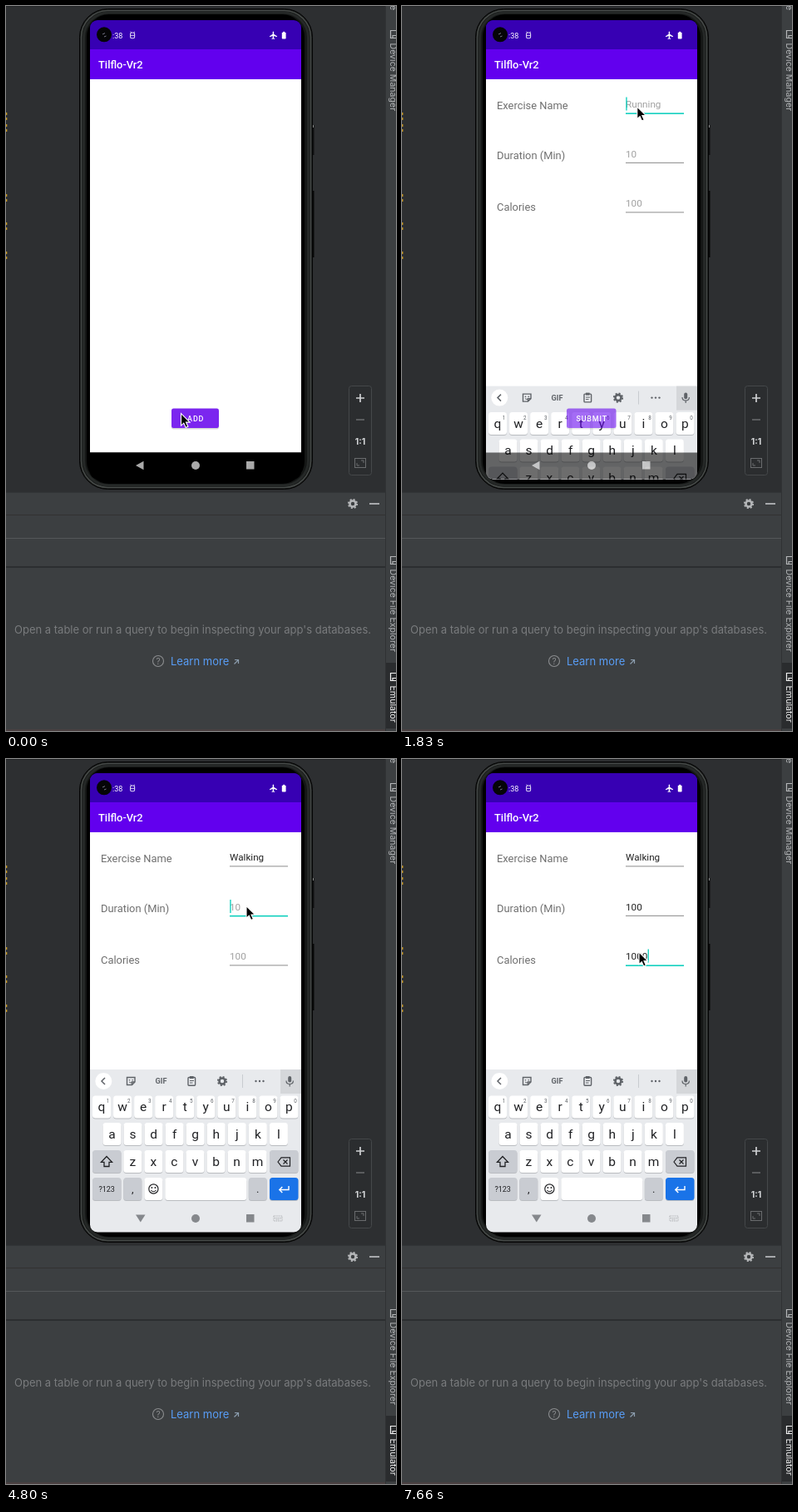
An HTML page that plays this animation: 469 px wide and 871 px high, repeating every 8000 ms.

```html
<!DOCTYPE html>
<html lang="en">
<head>
<meta charset="utf-8">
<title>Workout form demo</title>
<style>
html, body { margin: 0; width: 100%; height: 100%; overflow: hidden; background: #2d2f31; }
svg { display: block; }
text { font-family: Roboto, sans-serif; white-space: pre; }
.ide { font-family: Inter, sans-serif; }
</style>
</head>
<body>
<svg id="stage" width="469" height="871" viewBox="0 0 469 871"></svg>
<script>
const LOOP = 8000;
const stage = document.getElementById('stage');

// --- markup helpers ---
const rect = (x, y, w, h, fill, r = 0, more = '') =>
  `<rect x="${x}" y="${y}" width="${w}" height="${h}" rx="${r}" fill="${fill}" ${more}/>`;
const circle = (x, y, r, fill, more = '') => `<circle cx="${x}" cy="${y}" r="${r}" fill="${fill}" ${more}/>`;
const path = (d, fill, more = '') => `<path d="${d}" fill="${fill}" ${more}/>`;
const line = (d, color, w = 1, more = '') => path(d, 'none', `stroke="${color}" stroke-width="${w}" ${more}`);
const text = (x, y, s, size, fill, more = '') =>
  `<text x="${x}" y="${y}" font-size="${size}" fill="${fill}" ${more}>${s}</text>`;
const mid = (x, y, s, size, fill, more = '') => text(x, y, s, size, fill, 'text-anchor="middle" ' + more);
const group = (id, body, more = '') => `<g id="${id}" ${more}>${body}</g>`;
const gear = (x, y, color) =>
  circle(x, y, 3.5, 'none', `stroke="${color}" stroke-width="2.6"`) +
  circle(x, y, 5.1, 'none', `stroke="${color}" stroke-width="2" stroke-dasharray="2 2.005"`);

// --- IDE around the phone ---
function sideTab(y, label, color) {
  return line(`M469 ${y}H462.5V${y + 9}H469M465 ${y + 9}V${y + 6}H469`, color, 1.2) +
    text(0, 0, label, 10.6, color, `class="ide" transform="translate(462 ${y + 15}) rotate(90)"`);
}

function ide() {
  const grey = '#b4b6b8', dim = '#6a6c6e';
  const ticks = [128, 142, 226, 260, 295].map(y =>
    rect(0, y, 1.3, 3, '#c99a22') + rect(0, y + 6, 1.3, 3, '#c99a22')).join('');
  return rect(0, 0, 469, 871, '#2d2f31') + rect(0, 0, 469, 1, '#242628') + ticks +
    rect(0, 585, 457, 286, '#3c3f41') + rect(0, 584, 457, 1, '#323537') +
    rect(0, 611, 457, 1, '#323232') + rect(0, 639, 457, 1, '#555759') +
    rect(0, 673, 457, 2, '#2c2e30') + rect(0, 869, 457, 2, '#4a4041') +
    rect(456, 0, 13, 871, '#3c3f41') + rect(456, 0, 1, 871, '#303234') +
    rect(457, 789, 12, 79, '#2a2c2e') +
    text(0, 0, 'e', 10.6, grey, 'class="ide" transform="translate(462 -1) rotate(90)"') +
    sideTab(29.5, 'Device Manager', grey) + sideTab(661.5, 'Device File Explorer', grey) +
    sideTab(801.5, 'Emulator', '#f0f0f0') +
    rect(412.5, 456.5, 27, 107, '#2b2d2f', 3, 'stroke="#45484a"') +
    line('M421 471H431M426 466V476', '#cfd1d3', 1.7) + line('M421 497H431', dim, 1.5) +
    mid(426, 527, '1:1', 10.5, '#d5d7d9', 'class="ide" font-weight="700"') +
    rect(419.5, 543.5, 13, 11, 'none', 0, `stroke="${dim}"`) +
    line('M422 549V552H425M427 546H430V549', dim) +
    gear(417, 598, grey) + line('M437 598H449', grey, 1.8) +
    text(10, 754, "Open a table or run a query to begin inspecting your app's databases.", 13, '#797b7d', 'class="ide"') +
    circle(183, 787, 6.5, 'none', 'stroke="#8b8d8f" stroke-width="1.1"') +
    mid(183, 790.7, '?', 10, '#8b8d8f', 'class="ide"') +
    text(198, 792, 'Learn more', 13, '#589df6', 'class="ide"') +
    line('M274.5 790.5L279 786M275 785.5H279.5V790', '#8b9dae', 1.2);
}

function phone() {
  return rect(368, 143, 2.5, 36, '#101111') + rect(368, 143, 2, 3, '#8a8c8c') + rect(368, 222, 2.5, 80, '#070808') +
    rect(88.5, 3.5, 280, 577, '#151716', 34, 'stroke="#050505"') +
    rect(90.5, 5.5, 276, 573, 'none', 32, 'stroke="#464a48" stroke-width="1.5"') +
    rect(93.5, 8, 270, 568, 'none', 30, 'stroke="#252827" stroke-width="3"') +
    rect(97, 10, 262, 564, '#000', 27);
}

// --- app screens ---
const bars = rect(101, 17, 254, 36, '#3700b3') + rect(101, 52, 254, 36, '#6200ee') +
  text(111, 75, 'Tilflo-Vr2', 12.9, '#fff', 'font-weight="500"') + rect(101, 88, 254, 448.5, '#fff');

const button = (x, w, label, fill) =>
  rect(x, 485, w, 23.5, '#000', 2.5, 'opacity=".16"') + rect(x, 483.5, w, 23.5, fill, 2.5) +
  mid(228.2, 498.6, label, 9, '#fff', 'font-weight="500" letter-spacing=".8"');

const fields = [
  { label: 'Exercise Name', hint: 'Running', labelY: 124, y: 122 },
  { label: 'Duration (Min)', hint: '10', labelY: 184, y: 181.5 },
  { label: 'Calories', hint: '100', labelY: 246.3, y: 241 }
];

function form() {
  return bars + fields.map((f, i) =>
    text(114, f.labelY, f.label, 12.9, '#6f6f6f') +
    text(269, f.y, f.hint, 11.7, '#a0a0a0', `id="value${i}"`) +
    rect(269, f.y + 6.4, 70, 1, '#8c8c8c', 0, `id="under${i}"`)).join('') +
    rect(269, 123.6, 0, .8, '#333', 0, 'id="compose"') +
    rect(269, 0, 1.3, 16, '#03cdbb', 0, 'id="caret"');
}

function statusIcons() {
  return text(128, 38.8, ':38', 9, '#fff') +
    rect(149.6, 32, 5, 6.8, 'none', 1.6, 'stroke="#ddd6f3" stroke-width="1.1"') +
    line('M149.5 35.4H155M149.5 30.8L151 32M155 30.8L153.5 32', '#ddd6f3', .9) +
    path('M320.7 31Q321.4 30 322.1 31V33.7L326 36.2V37.3L322.1 36.1V38.4L323.2 39.2V40L321.4 39.5L319.6 40V39.2L320.7 38.4V36.1L317 37.3V36.2L320.7 33.7Z', '#fff') +
    rect(331.8, 31.8, 4.8, 7.8, '#fff', .8) + rect(333.2, 30.8, 2, 1.5, '#fff') +
    circle(118, 34.3, 9, '#050507') + line('M116 34L119 32.6M118 37L120.5 36', '#77778a', 1);
}

// --- keyboard ---
const INK = '#202124', SOFT = '#5f6368', STEP = 25.05;

function key(x, y, w, fill = '#fff') {
  return rect(x, y + 1, w, 27, '#b9bcc0', 3.5) + rect(x, y, w, 27, fill, 3.5);
}

function keyRow(chars, x, y) {
  return [...chars].map((c, i) => {
    const cx = x + i * STEP;
    const digit = y < 410 ? mid(cx + 7.6, y + 8.6, (i + 1) % 10, 6.3, SOFT) : '';
    return key(cx - 11, y, 22) + mid(cx, y + 18.8, c, 15.5, INK, 'class="letter"') + digit;
  }).join('');
}

const tools =
  line('M119 383L115 387L119 391', SOFT, 1.5) +
  line('M145.5 382.5H155V388L151.5 391.5H145.5ZM155 388H151.5V391.5', SOFT, 1.4) +
  circle(148.5, 385.8, .8, SOFT) + circle(152.2, 385.8, .8, SOFT) + line('M148 388Q150 390 152 388', SOFT) +
  mid(186.5, 390.3, 'GIF', 9.2, SOFT, 'font-weight="700"') +
  rect(219, 382.5, 8.6, 9.8, 'none', 1, `stroke="${SOFT}" stroke-width="1.4"`) +
  rect(221, 381, 4.6, 3, SOFT) + line('M221 386.5H226M221 389H224.5', SOFT) +
  gear(260, 387, SOFT) + rect(284, 379, 1, 16, '#c9ccd0') +
  [300.5, 305, 309.5].map(x => circle(x, 387, 1.2, SOFT)).join('');

const words = line('M115.5 383L119.5 387L115.5 391', SOFT, 1.5) +
  rect(190, 379, 1, 16, '#c9ccd0') + rect(264, 379, 1, 16, '#c9ccd0') +
  [157.5, 227, 296].map(x => mid(x, 391.5, '', 12, '#35373a', 'class="word"')).join('');

function keyboard() {
  const mod = '#c9ccd2';
  return rect(101, 373, 254, 196, '#e8eaed') + rect(330, 373, 25, 29, '#d5d7da') +
    circle(117.3, 387, 10, '#fff') + group('tools', tools) + group('words', words) +
    rect(339.2, 381, 4, 7.6, SOFT, 2) + line('M337 386.5Q337 390.5 341.2 390.5Q345.4 390.5 345.4 386.5M341.2 390.5V393.5', SOFT, 1.2) +
    keyRow('qwertyuiop', 115, 404.5) + keyRow('asdfghjkl', 127.5, 437) + keyRow('zxcvbnm', 152.3, 470) +
    key(104, 470, 34.5, mod) + key(317, 470, 34.5, mod) +
    line('M121 477.5L114.5 484.3H118V489.5H124V484.3H127.5Z', INK, 1.3) +
    line('M327 484L331 478.8H341.5V489.2H331ZM333.5 481.5L338.5 486.5M338.5 481.5L333.5 486.5', INK, 1.2) +
    key(104, 503, 34.5, mod) + mid(121.2, 519.8, '?123', 9, INK) +
    key(141.3, 503, 22, mod) + mid(152.3, 520.5, ',', 13, INK) +
    key(166.4, 503, 22) + circle(177.4, 516.5, 5.6, 'none', `stroke="${INK}" stroke-width="1.2"`) +
    circle(175.4, 515, .9, INK) + circle(179.4, 515, .9, INK) + line('M174.3 518Q177.4 521.6 180.5 518', INK, 1.1) +
    key(191.3, 503, 98) + key(291.8, 503, 22, mod) + mid(302.8, 520.5, '.', 13, INK) +
    key(317, 503, 34.5, '#1a73e8') +
    line('M340 513V517.5H329M332.3 514L328.8 517.5L332.3 521', '#fff', 1.4) +
    path('M156 547.5H167.5L161.8 556.5Z', '#85888c') + circle(228, 552, 5, '#85888c') + rect(289, 547, 9.5, 9.5, '#85888c') +
    rect(322, 549, 10, 6, 'none', 0, 'stroke="#a9abae" stroke-width="1" stroke-dasharray="1.2 1"') +
    line('M323 551.5H331M324.5 553.3H329.5', '#a9abae', 1, 'stroke-dasharray="1.2 1"');
}

const navBar = rect(101, 536.5, 254, 32, '#000') + path('M165.5 546.8V557.2L156 552Z', '#a9a9a9') +
  circle(228, 552, 5, '#a9a9a9') + rect(289, 547, 9.5, 9.5, '#a9a9a9');

stage.innerHTML = `<clipPath id="glass">${rect(101, 17, 254, 551.5, '#000', 9)}</clipPath>` + ide() + phone() +
  `<g clip-path="url(#glass)">` +
  group('home', bars + button(199, 57, 'ADD', '#7b26ef')) + group('form', form()) + group('keys', keyboard()) +
  group('nav', navBar) + group('submit', button(198, 59.5, 'SUBMIT', '#6200ee')) + '</g>' + statusIcons() +
  group('pointer', path('M0 0V14.6L3.3 11.6L5.7 17L8.4 15.8L6 10.6H10.6Z', '#000', 'stroke="#fff" stroke-width="1.1"'));

// --- timeline ---
const pointerPath = [
  [370, 210.5, 489.5], [560, 231, 335], [700, 254, 214.5], [820, 272, 165], [930, 280, 140], [990, 280, 140], [1280, 282.8, 121],
  [4160, 282.8, 121], [4600, 289, 174], [4720, 289, 176.5], [5690, 289, 176.5], [6300, 284, 232],
  [6480, 284, 234], [6650, 284, 234], [6710, 285, 232]
];
const focusTimes = [1460, 4700, 6400];
const typed = [
  [[2520, 'W'], [2670, 'Wa'], [2790, 'Wal'], [2910, 'Walk'], [3630, 'Walki'], [3720, 'Walkin'], [3820, 'Walking']],
  [[5250, '1'], [5370, '10'], [5490, '100']],
  [[6920, '1'], [7040, '10'], [7270, '100'], [7390, '1000']]
];
const suggestions = [
  [2520, 'We Why What'], [2670, 'Was Want Wait'], [2790, 'Wal Wall Walk'], [2910, 'Walk Walks Walked'],
  [3120, 'Walk Walking Wall'], [3630, 'Walki Walking Walkie'], [3720, 'Walkin Walking Walk'], [3920, 'Walking Walk Walked']
];

const $ = id => document.getElementById(id);
const set = (id, attrs) => { for (const k in attrs) $(id).setAttribute(k, attrs[k]); };
const clamp01 = v => Math.min(1, Math.max(0, v));
const progress = (t, a, b) => clamp01((t - a) / (b - a));
const easeOut = p => 1 - (1 - p) ** 2;
const latest = (list, t) => list.reduce((found, [at, v]) => t >= at ? v : found, '');
const letters = [...document.querySelectorAll('.letter')];
const wordSlots = [...document.querySelectorAll('.word')];

function pointerAt(t) {
  const i = pointerPath.findIndex(p => p[0] > t);
  if (i === 0) return pointerPath[0].slice(1);
  if (i < 0) return pointerPath.at(-1).slice(1);
  const [t0, x0, y0] = pointerPath[i - 1], [t1, x1, y1] = pointerPath[i];
  const p = (t - t0) / (t1 - t0);
  return [x0 + (x1 - x0) * p, y0 + (y1 - y0) * p];
}

function drawFields(t) {
  const focus = focusTimes.filter(at => t >= at).length - 1;
  fields.forEach((f, i) => {
    const value = latest(typed[i], t), el = $('value' + i), active = i === focus;
    el.textContent = value || f.hint;
    el.setAttribute('fill', value ? '#222' : '#a0a0a0');
    set('under' + i, { fill: active ? '#03cdbb' : '#8c8c8c', height: active ? 1.5 : 1 });
    if (active) set('caret', { x: 269.3 + (value ? el.getComputedTextLength() : 0), y: f.y - 12.5 });
  });
  set('caret', { opacity: focus < 0 ? 0 : 1 });
  const composing = focus === 0 && t >= 3120;
  set('compose', { width: composing ? $('value0').getComputedTextLength() : 0 });
}

function drawKeyboard(t) {
  const slide = easeOut(progress(t, 1720, 2040));
  set('keys', { transform: `translate(0 ${(1 - slide) * 196})`, opacity: slide ? 1 : 0 });
  const caps = t >= 2460 && t < 2520;
  for (const el of letters) {
    const c = el.textContent;
    el.textContent = caps ? c.toUpperCase() : c.toLowerCase();
  }
  const row = t < focusTimes[1] ? latest(suggestions, t) : '';
  set('tools', { opacity: row ? 0 : 1 });
  set('words', { opacity: row ? 1 : 0 });
  const parts = row.split(' ');
  wordSlots.forEach((el, i) => el.textContent = parts[i] || '');
}

function draw(t) {
  const open = progress(t, 360, 560);
  const shift = `translate(0 ${12 * (1 - easeOut(open))})`;
  const old = 1 - progress(t, 1720, 1980);
  set('form', { opacity: open, transform: shift });
  set('submit', { opacity: open * old, transform: shift });
  set('nav', { opacity: old });
  drawFields(t);
  drawKeyboard(t);
  set('pointer', { transform: `translate(${pointerAt(t)})` });
}

const start = performance.now();
function tick() {
  draw((performance.now() - start) % LOOP);
  requestAnimationFrame(tick);
}
tick();
</script>
</body>
</html>
```
